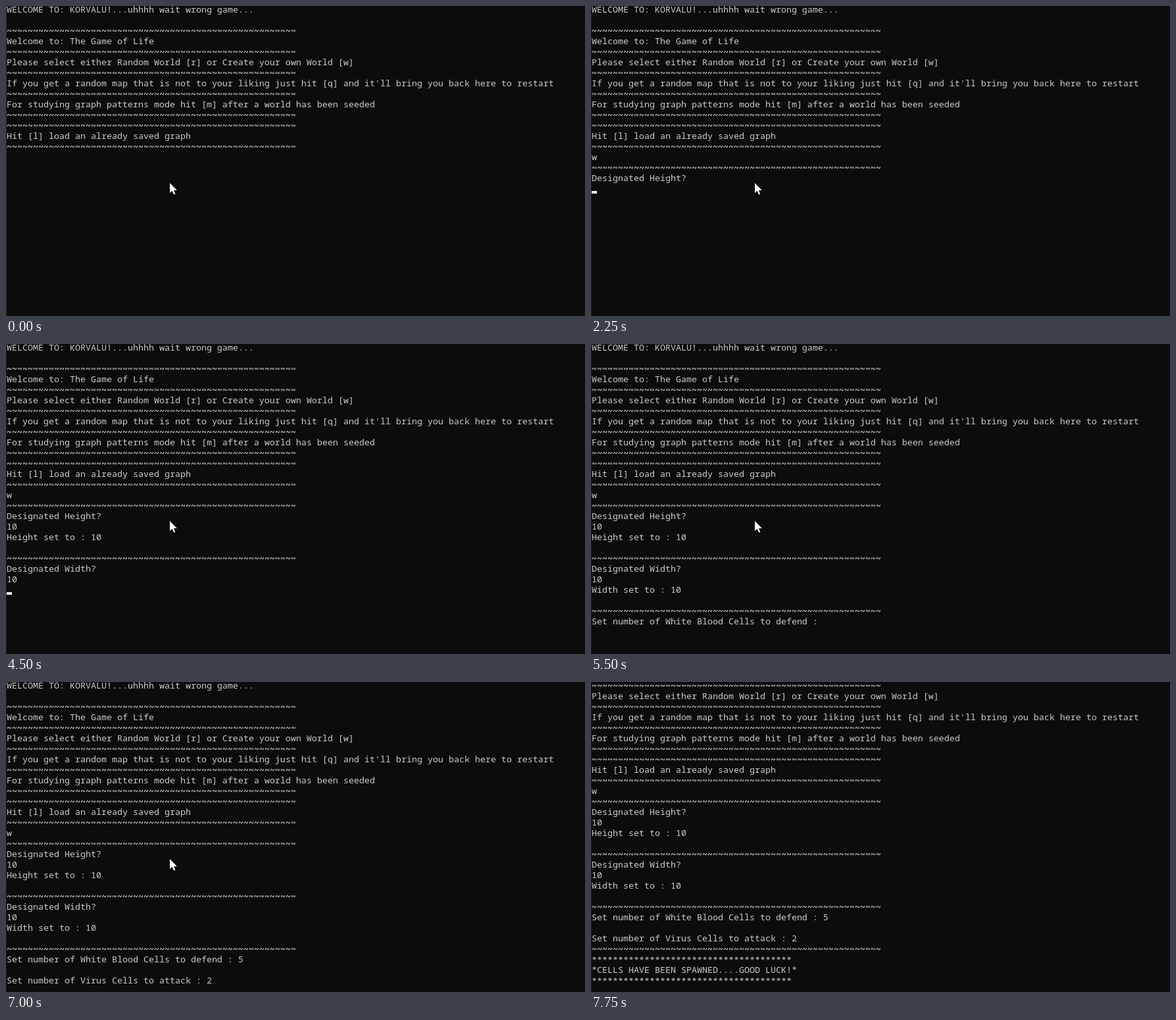
Recreate the animation shown at these times as an HTML page with a canvas. Size 880x471 px, loop 8 s.

```html
<!DOCTYPE html>
<html lang="en">
<head>
<meta charset="utf-8">
<title>Terminal session</title>
<style>
  html, body { margin: 0; width: 100%; height: 100%; overflow: hidden; background: #0c0c0c; }
  canvas { display: block; }
</style>
</head>
<body>
<canvas id="screen" width="880" height="471"></canvas>
<script>
const ctx = document.getElementById('screen').getContext('2d');
const LOOP = 8000, COLUMN = 8, LINE = 16, VISIBLE_ROWS = 30;
const POINTER_HIDES = 7750, FOCUS_CHANGES = 250;
const FONT = '13.3333px "Noto Sans Mono", "DejaVu Sans Mono", monospace';
const rule = '~'.repeat(55), stars = '*'.repeat(38);

const intro = [
  'WELCOME TO: KORVALU!...uhhhh wait wrong game...', '', rule,
  'Welcome to: The Game of Life', rule,
  'Please select either Random World [r] or Create your own World [w]', rule,
  "If you get a random map that is not to your liking just hit [q] and it'll bring you back here to restart", rule,
  'For studying graph patterns mode hit [m] after a world has been seeded', rule, rule,
  'Hit [l] load an already saved graph', rule, ''
].join('\n');

// [time in ms, text appended to the terminal, caret visible]
const session = [
  [0, intro, false],
  [750, '', true],
  [1250, '', false],
  [1750, 'w', true],
  [2250, `\n${rule}\nDesignated Height?\n`, true],
  [2750, '', false],
  [3000, '1', true],
  [3250, '0', false],
  [3500, `\nHeight set to : 10\n\n${rule}\nDesignated Width?\n`, true],
  [4000, '1', true],
  [4250, '0', false],
  [4500, '\n', true],
  [4750, `Width set to : 10\n\n${rule}\nSet number of White Blood Cells to defend : `, true],
  [5500, '', false],
  [5750, '5', true],
  [6000, '\n\nSet number of Virus Cells to attack : ', true],
  [6500, '2', true],
  [7000, '', false],
  [7250, `\n${rule}\n${stars}\n*CELLS HAVE BEEN SPAWNED....GOOD LUCK!*\n${stars}\n`, false]
];

const pointer = new Path2D('M249 269V284L252.5 280.8L255 286.2H257.3L255 280H259.8Z');

function drawTerminal(t) {
  const past = session.filter(([time]) => time <= t);
  const lines = past.map(([, text]) => text).join('').split('\n');
  const scroll = Math.max(0, lines.length - VISIBLE_ROWS);

  ctx.fillStyle = '#ccc';
  lines.slice(scroll).forEach((line, row) => {
    const nudge = line === rule || line === stars ? 1 : 0;
    ctx.font = line === rule ? `bold ${FONT}` : FONT;
    ctx.fillText(line, 1, row * LINE + 10 + nudge);
  });

  if (past.at(-1)[2]) {
    const row = lines.length - 1 - scroll;
    ctx.fillStyle = '#f2f2f2';
    ctx.fillRect(1 + lines.at(-1).length * COLUMN, row * LINE + 9, COLUMN, 4);
  }
}

function draw(t) {
  ctx.fillStyle = '#0c0c0c';
  ctx.fillRect(0, 0, 880, 471);
  ctx.fillStyle = t < FOCUS_CHANGES ? '#2c2c2c' : '#1c1c1c';
  ctx.fillRect(0, 0, 1, 471);
  drawTerminal(t);
  if (t < POINTER_HIDES) {
    ctx.fillStyle = '#fff';
    ctx.fill(pointer);
  }
}

const start = performance.now();
function frame() {
  draw((performance.now() - start) % LOOP);
  requestAnimationFrame(frame);
}
frame();
</script>
</body>
</html>
```
